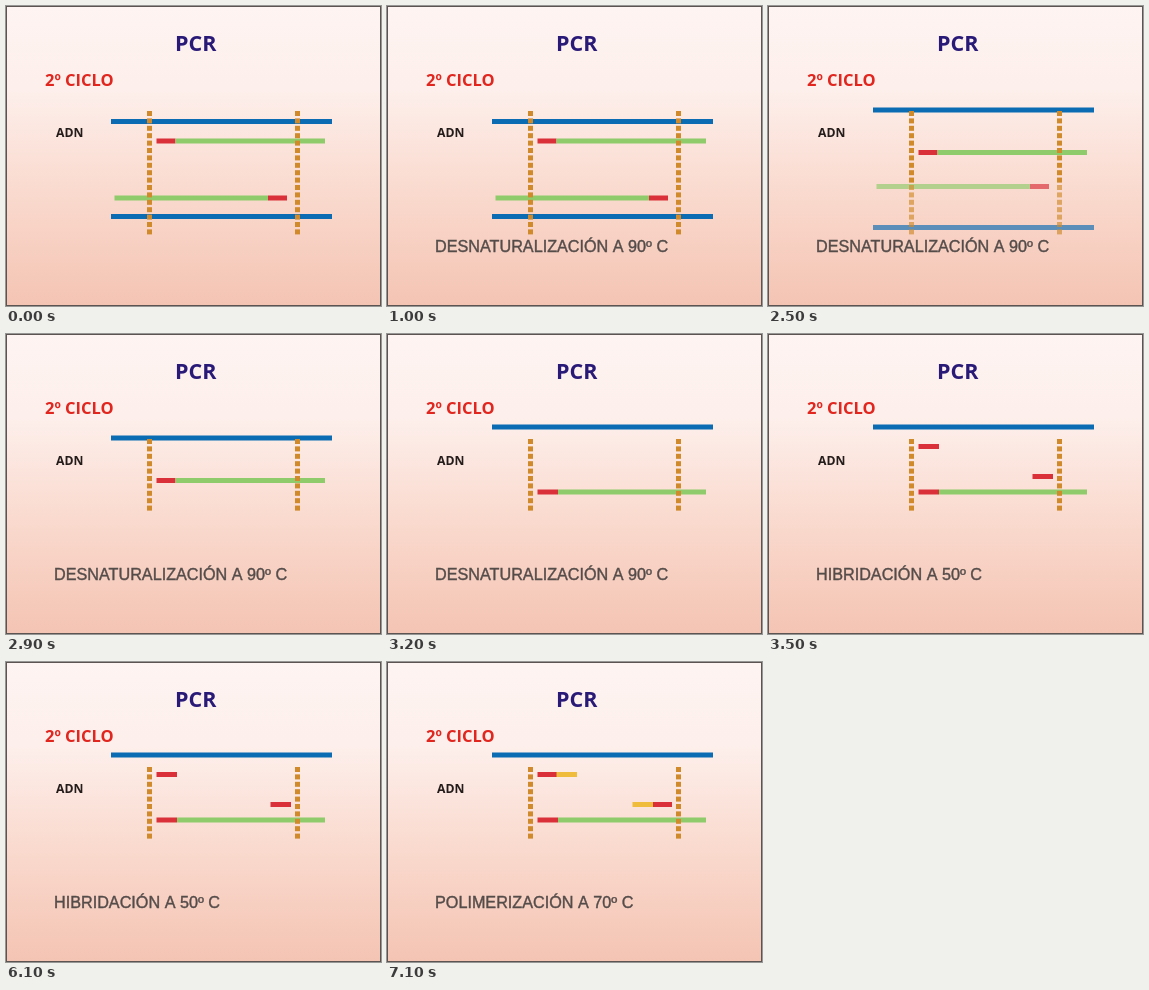
These frames come from a looping animation (375 by 300 pixels, 8 s). An HTML page with a canvas:

```html
<!DOCTYPE html>
<html lang="es">
<head>
<meta charset="utf-8">
<title>PCR</title>
<style>
html, body { margin: 0; width: 100%; height: 100%; overflow: hidden; }
canvas { display: block; width: 375px; height: 300px; }
</style>
</head>
<body>
<canvas id="stage" width="375" height="300"></canvas>
<script>
const ctx = document.getElementById('stage').getContext('2d');
const LOOP = 8000;
const BLUE = '#0b6cb3', GREEN = '#8fcb6b', RED = '#d9303a';
const YELLOW = '#efbc3c', ORANGE = '#d08a2c';
const HUMAN = '"Open Sans", "Noto Sans", sans-serif';
const ARIAL = '"Liberation Sans", Arial, sans-serif';

function text(str, x, y, font, color) {
  ctx.font = font;
  ctx.fillStyle = color;
  ctx.fillText(str, x, y);
}

// horizontal strand centred on y
function bar(x1, x2, y, color) {
  ctx.fillStyle = color;
  ctx.fillRect(x1, y - 2.5, x2 - x1, 5);
}

function dashes(from, to) {
  ctx.fillStyle = ORANGE;
  for (const x of [141, 289]) {
    for (let i = from; i < to; i++) ctx.fillRect(x, 105 + i * 7.4, 5, 5);
  }
}

function arrow(x1, y1, x2, y2) {
  const a = Math.atan2(y2 - y1, x2 - x1);
  const len = Math.hypot(x2 - x1, y2 - y1);
  ctx.save();
  ctx.translate(x1, y1);
  ctx.rotate(a);
  ctx.fillStyle = '#181414';
  ctx.fillRect(0, -1, len - 5, 2);
  ctx.beginPath();
  ctx.moveTo(len, 0);
  ctx.lineTo(len - 8, -3.6);
  ctx.lineTo(len - 8, 3.6);
  ctx.fill();
  ctx.restore();
}

function background() {
  const g = ctx.createLinearGradient(0, 0, 0, 300);
  g.addColorStop(0, '#fef4f2');
  g.addColorStop(0.28, '#fdefeb');
  g.addColorStop(0.6, '#fadbd0');
  g.addColorStop(1, '#f4c4b3');
  ctx.fillStyle = g;
  ctx.fillRect(0, 0, 375, 300);
  ctx.strokeStyle = '#5c5452';
  ctx.lineWidth = 1;
  ctx.strokeRect(0.5, 0.5, 374, 299);
}

function caption(t) {
  if (t < 1000) return;
  const str = t < 3500 ? 'DESNATURALIZACIÓN A 90º C'
    : t < 7100 ? 'HIBRIDACIÓN A 50º C' : 'POLIMERIZACIÓN A 70º C';
  text(str, 48, 246, '16.2px ' + ARIAL, '#544c4a');
  ctx.strokeStyle = '#544c4a';
  ctx.lineWidth = 0.4;
  ctx.strokeText(str, 48, 246);
}

function upperPair(t) {
  const stage = t < 2000 ? 0 : t < 3200 ? 1 : 2;
  const y = [135, 146.5, 158][stage];
  const split = stage === 2 ? 171 : 169.5;
  bar(105, 326, [115.5, 104, 93][stage], BLUE);
  bar(150.5, split, y, RED);
  bar(split, 319, y, GREEN);
}

function lowerPair(t) {
  const apart = t >= 2000;
  const y = apart ? 180.5 : 192;
  bar(108.5, 262, y, GREEN);
  bar(262, 281, y, RED);
  bar(105, 326, apart ? 221.5 : 210.5, BLUE);
}

function primers(t) {
  bar(150.5, 171, 112.5, RED);
  bar(264.5, 285, 142.5, RED);
  if (t >= 7100) {
    bar(169.5, 190, 112.5, YELLOW);
    bar(245.5, 266, 142.5, YELLOW);
  }
}

function draw(t) {
  background();
  text('PCR', 169, 45, 'bold 21.5px "Noto Sans", ' + HUMAN, '#2a1a78');
  text('2º CICLO', 39, 80, 'bold 16.5px ' + HUMAN, '#e0261f');
  text('ADN', 50, 131, 'bold 12.2px ' + HUMAN, '#241c1a');

  upperPair(t);
  dashes(0, 10);

  // the lower half fades out in three steps
  const alpha = t < 2500 ? 1 : t < 2700 ? 0.66 : t < 2900 ? 0.33 : 0;
  if (alpha) {
    ctx.globalAlpha = alpha;
    lowerPair(t);
    dashes(10, 17);
    ctx.globalAlpha = 1;
  }

  caption(t);
  if (t >= 3500) primers(t);
  if (t >= 4500 && t < 6100) {
    text('CEBADOR', 190.5, 133, 'bold 13.5px ' + HUMAN, '#e0261f');
  }
  if (t >= 4800 && t < 5800) {
    arrow(187, 126, 167, 118);
    arrow(244, 134, 266, 141.5);
  }
}

const start = performance.now();
function tick() {
  draw((performance.now() - start) % LOOP);
  requestAnimationFrame(tick);
}
tick();
</script>
</body>
</html>
```
